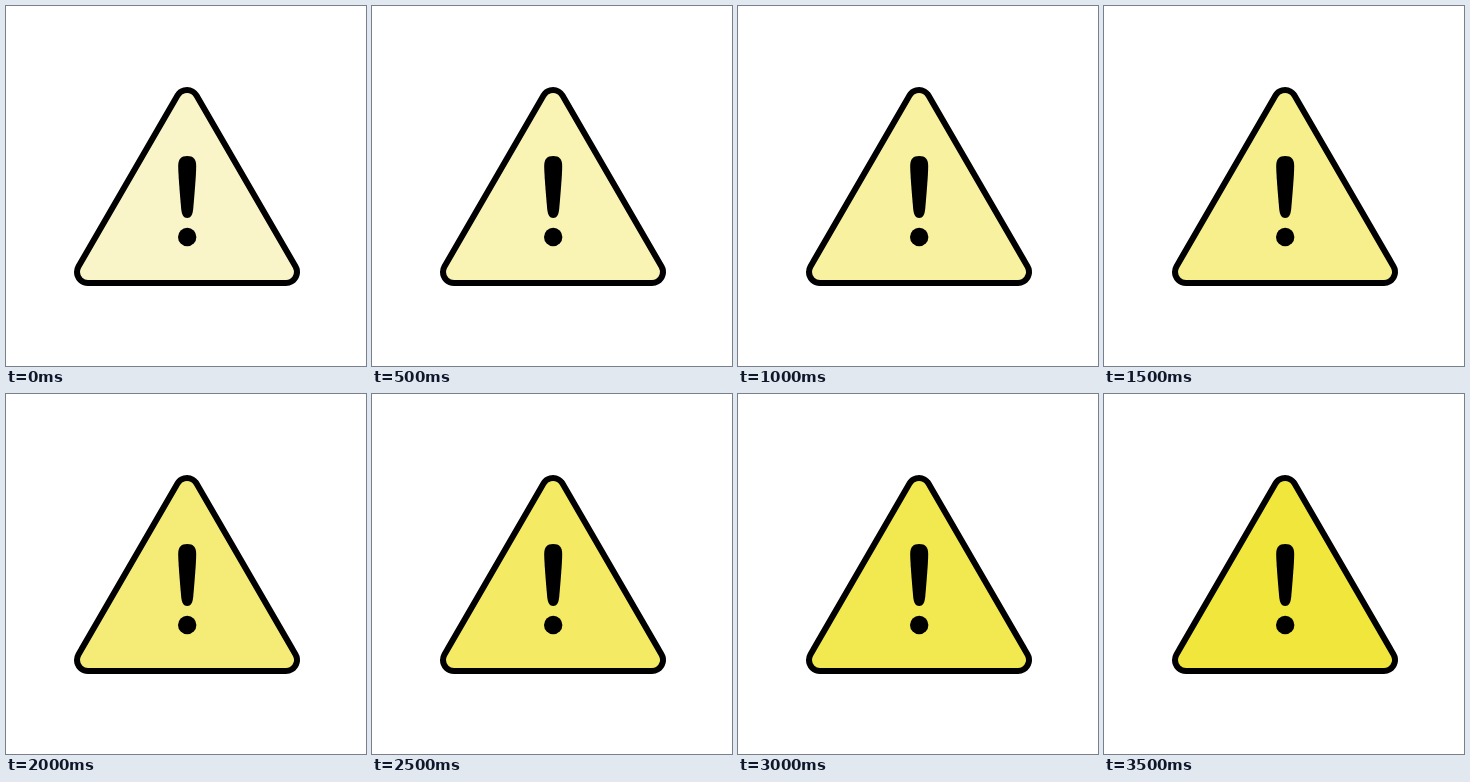
Write an HTML page that moves like this. It is 360 px wide and 360 px high and loops after 8 s.

```html
<!DOCTYPE html>
<html lang="en">
<head>
<meta charset="utf-8">
<title>Warning sign</title>
<style>
  html, body { margin: 0; width: 100%; height: 100%; overflow: hidden; background: #fff; }
  svg { display: block; width: 100%; height: 100%; }
  .plate { stroke-linejoin: round; }
</style>
</head>
<body>
<svg viewBox="0 0 360 360">
  <path class="plate" d="M181 95L280 266H82Z" fill="#000" stroke="#000" stroke-width="28"/>
  <path class="plate" id="face" d="M181 95L280 266H82Z" stroke-width="16"/>
  <path d="M172.2 160C172.2 153 175 150 181.2 150S190.2 153 190.2 160C190.2 168 188.6 187 187.2 203C186.6 209 184.8 212 181.2 212S175.8 209 175.2 203C173.8 187 172.2 168 172.2 160Z"/>
  <circle cx="181.2" cy="231" r="9.2"/>
</svg>
<script>
  const LOOP = 8000, STEP = 500, LAST = 7;
  const PALE = [250, 245, 200], STRONG = [241, 230, 60];
  const face = document.getElementById('face');

  function draw(time) {
    const p = Math.min(LAST, Math.floor((time % LOOP) / STEP)) / LAST;
    const color = `rgb(${PALE.map((c, i) => Math.round(c + (STRONG[i] - c) * p))})`;
    face.setAttribute('fill', color);
    face.setAttribute('stroke', color);
  }

  const start = performance.now();
  function tick() {
    draw(performance.now() - start);
    requestAnimationFrame(tick);
  }
  tick();
</script>
</body>
</html>
```
